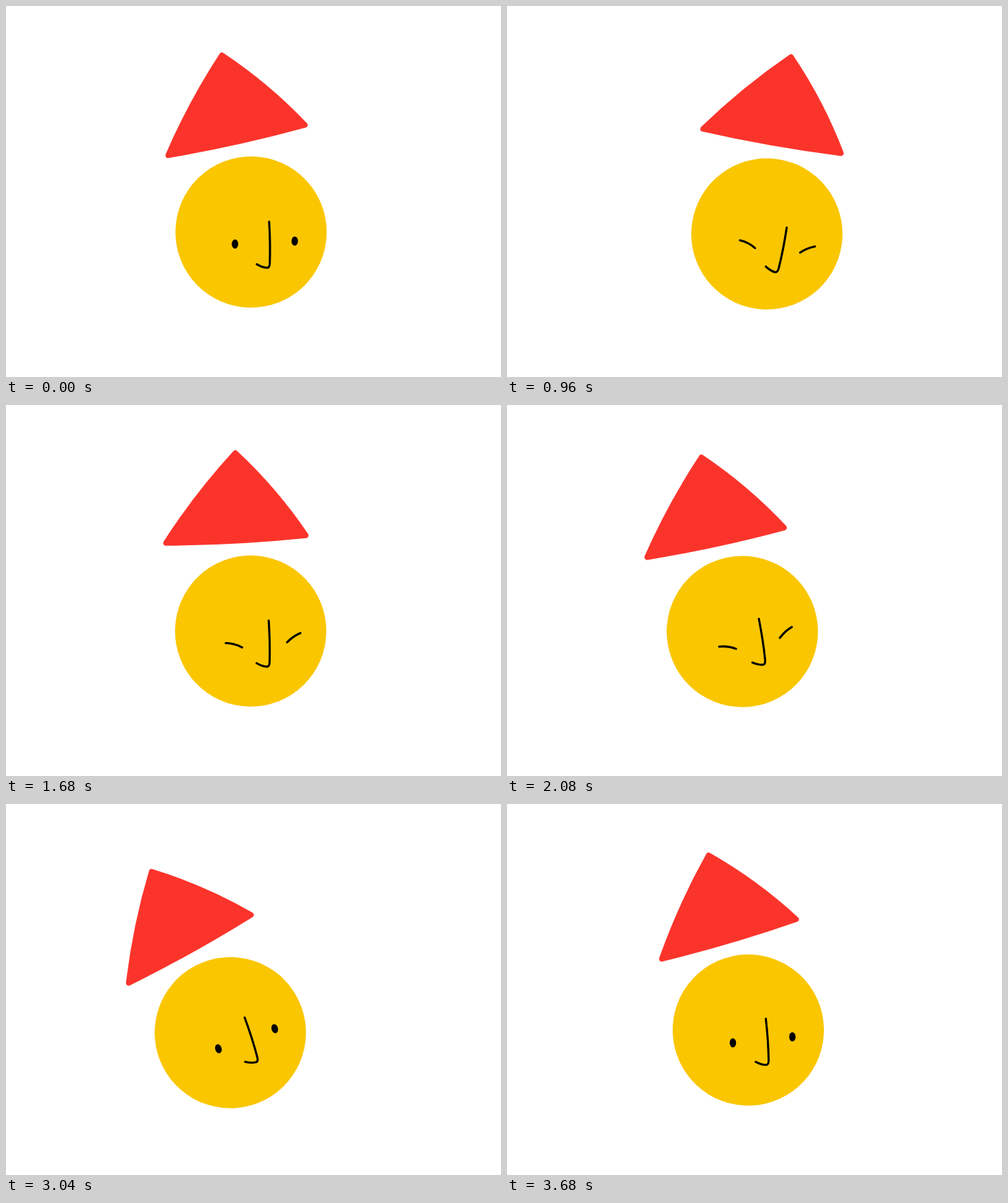
Recreate the animation shown at these times as an HTML page. Size 720 px wide and 540 px high, loop 3760 ms.

```html
<!DOCTYPE html>
<html lang="en">
<head>
<meta charset="utf-8">
<title>Rocking ball with a hat</title>
<style>
  html, body { margin: 0; width: 100%; height: 100%; overflow: hidden; background: #fff; }
  svg { display: block; width: 720px; height: 540px; }
  .line { fill: none; stroke: #000; stroke-width: 3.1; stroke-linecap: round; stroke-linejoin: round; }
</style>
</head>
<body>
<svg viewBox="0 0 720 540">
  <g transform="translate(354.25 433)">
    <!-- everything rocks around a point near the bottom of the ball -->
    <g id="ball">
      <circle cy="-104" r="110" fill="#fac600"/>
      <path class="line" d="M26-119.6Q28.6-88 28.2-59Q28-52.6 24.5-52.5Q18-52.6 9.3-57.4"/>
      <g id="open">
        <ellipse cx="-23" cy="-86.1" rx="4.7" ry="6.7"/>
        <ellipse cx="63.8" cy="-92.2" rx="4.7" ry="6.7"/>
      </g>
      <g id="closed" class="line">
        <path d="M-36-86Q-23.3-86-12-80"/>
        <path d="M53.2-88.5Q61.6-97.5 72.3-102.2"/>
      </g>
      <g transform="rotate(-5.7) translate(0 -237) rotate(5.7)">
        <path id="hat" fill="#fb342b" stroke="#fb342b" stroke-width="8" stroke-linejoin="round"
          d="M-101.8-1.5Q-53.2-68.7 6-126.7Q61-69.6 101.8-1.5Q0 3.5-101.8-1.5Z"/>
      </g>
    </g>
  </g>
</svg>
<script>
  const LOOP = 3760, STEP = 80;

  // [ms, degrees]
  const rock = [
    [0, 1.2], [480, 15.5], [560, 18.1], [960, 13.2], [1120, 10.4], [1680, 0.9], [2240, -9.6],
    [2480, -14.3], [2800, -21], [3040, -15.6], [3360, -8.6], [3680, -1.8], [LOOP, 1.2]
  ];
  const tilt = [
    [0, -13.7], [560, -13.4], [960, -3.2], [1680, -4], [2240, -6.2], [2480, -9.6],
    [2800, -12.6], [3040, -13.5], [3680, -14.6], [LOOP, -13.7]
  ];

  const el = id => document.getElementById(id);
  const ball = el('ball'), hat = el('hat'), open = el('open'), closed = el('closed');

  function at(keys, t) {
    const i = keys.findIndex(k => k[0] > t);
    const [t0, a] = keys[i - 1], [t1, b] = keys[i];
    return a + (b - a) * (t - t0) / (t1 - t0);
  }

  const turn = (node, deg) => node.setAttribute('transform', `rotate(${deg.toFixed(3)})`);
  const show = (node, on) => node.setAttribute('visibility', on ? 'visible' : 'hidden');

  function draw(ms) {
    const t = Math.floor((ms % LOOP) / STEP) * STEP;
    const asleep = t > 560 && t <= 2800;
    turn(ball, at(rock, t));
    turn(hat, at(tilt, t));
    show(open, !asleep);
    show(closed, asleep);
  }

  const start = performance.now();
  function tick() {
    draw(performance.now() - start);
    requestAnimationFrame(tick);
  }
  tick();
</script>
</body>
</html>
```
